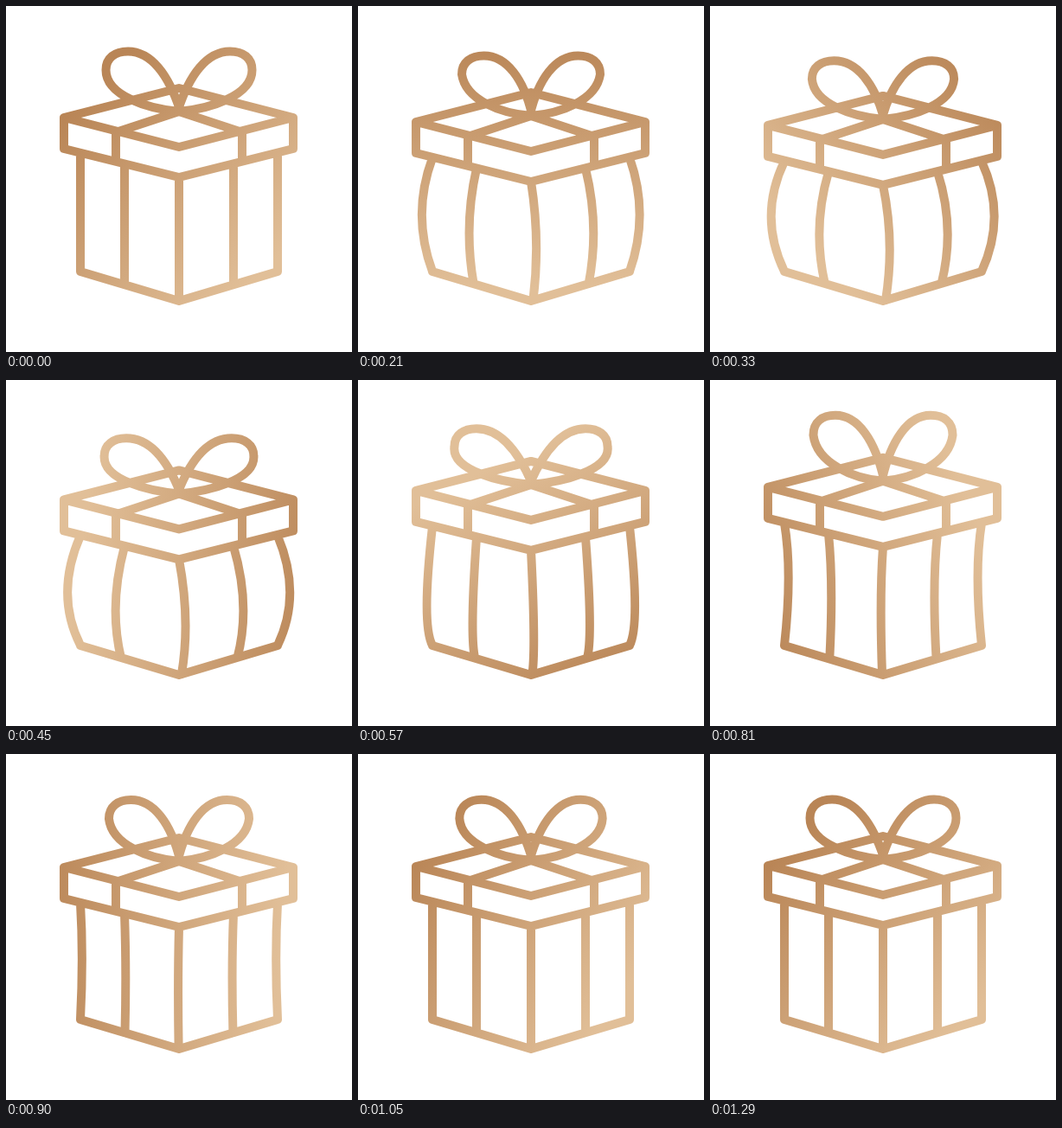
Recreate the animation shown at these times as an HTML page. Size 400 by 400 pixels, loop 3.32 s.

```html
<!DOCTYPE html>
<html>
<head>
<meta charset="utf-8">
<title>Gift box</title>
<style>
html, body { margin: 0; width: 100%; height: 100%; overflow: hidden; background: #fff; }
svg { display: block; width: 100%; height: 100%; }
</style>
</head>
<body>
<svg viewBox="0 0 400 400">
  <defs>
    <linearGradient id="gold" gradientUnits="userSpaceOnUse">
      <stop stop-color="#e1bf98"/>
      <stop offset="1" stop-color="#b98556"/>
    </linearGradient>
  </defs>
  <path id="gift" fill="none" stroke="url(#gold)" stroke-width="10" stroke-linecap="round" stroke-linejoin="round"/>
</svg>
<script>
const LOOP = 3320, END = 1290, STEP = 30, TURN = 1200;

const ease = u => (1 - Math.cos(Math.PI * u)) / 2;

// Eases through [time, value] poses, holding the first and last
function through(t, ...poses) {
  const i = poses.findIndex(([time]) => time > t);
  if (i < 0) return poses.at(-1)[1];
  if (i === 0) return poses[0][1];
  const [t0, a] = poses[i - 1], [t1, b] = poses[i];
  return a + (b - a) * ease((t - t0) / (t1 - t0));
}

// The lid squashes the box, springs up and settles; the bow lags behind
const poseAt = t => ({
  lid: through(t, [0, 0], [420, 10], [710, -11], [930, 2.6], [1170, -0.6], [END, 0]),
  bulge: through(t, [0, 0], [300, 17], [420, 17], [750, -6], [1000, 0]),
  sag: through(t, [420, 0], [570, 45], [810, -15], [960, 0]),
  spread: through(t, [0, 0], [210, -4.5], [570, 4], [780, -4], [END, 0]),
  droop: through(t, [210, 0], [540, 6.5], [690, -12], [930, -1], [END, 0])
});

// One upright of the body; the inner ones also slide along the bottom edge
function upright(x, weight, { lid, bulge, sag }) {
  const out = Math.abs(x - 200);
  const top = 198 - 0.24 * out + lid;
  const foot = out > 100 ? x : x + 0.4 * weight * bulge;
  const bottom = 341 - 0.3 * Math.abs(foot - 200);
  const cx = (x + foot) / 2 + 2 * weight * bulge - (foot - x);
  return `M${x} ${top}Q${cx} ${(top + bottom) / 2 + sag} ${foot} ${bottom}`;
}

function body(p) {
  return upright(86, -0.9, p) + upright(137, -0.62, p) + upright(200, 0.45, p)
    + upright(263, 0.68, p) + upright(314, 0.86, p) + "M86 307L200 341L314 307";
}

function lidPath(y) {
  return `M67 ${129 + y}L200 ${95 + y}L332 ${129 + y}v36L200 ${198 + y}L67 ${165 + y}Z`
    + `L200 ${163 + y}L332 ${129 + y}`
    + `M127 ${177 + y}v-31L200 ${122 + y}L273 ${146 + y}v31`;
}

function bowLoop({ lid, spread, droop }, side) {
  const pt = (dx, y, wide, drop) =>
    `${200 + side * (dx + wide * spread)} ${y + lid + drop * droop} `;
  return "M" + pt(0, 122, 0, 0)
    + "C" + pt(35, 119, 0, 0) + pt(84.5, 104, 2, 0.4) + pt(84.5, 74, 1, 0.8)
    + "C" + pt(84.5, 60, 1, 1) + pt(74, 52.5, 1, 1) + pt(59, 52.5, 1, 1)
    + "C" + pt(32, 52.5, 0.9, 1) + pt(12, 80, 0.8, 0.6) + pt(-1, 120, 0, 0);
}

const gift = document.getElementById("gift");
const gold = document.getElementById("gold");

// The shading makes one full turn, moving outwards on the way
function shade(t) {
  const u = Math.min(t / TURN, 1);
  const angle = Math.PI * (2 * ease(u ** 0.85) - 0.75);
  const shift = 35 * Math.sin(Math.PI * u);
  [-145, 145].forEach((r, i) => {
    gold.setAttribute("x" + (i + 1), 200 + Math.cos(angle) * (r + shift));
    gold.setAttribute("y" + (i + 1), 200 + Math.sin(angle) * (r + shift));
  });
}

const start = performance.now();
function tick() {
  const now = (performance.now() - start) % LOOP;
  const t = Math.min(Math.floor(now / STEP) * STEP, END);
  const p = poseAt(t);
  gift.setAttribute("d", body(p) + lidPath(p.lid) + bowLoop(p, -1) + bowLoop(p, 1));
  shade(t);
  requestAnimationFrame(tick);
}
tick();
</script>
</body>
</html>
```
